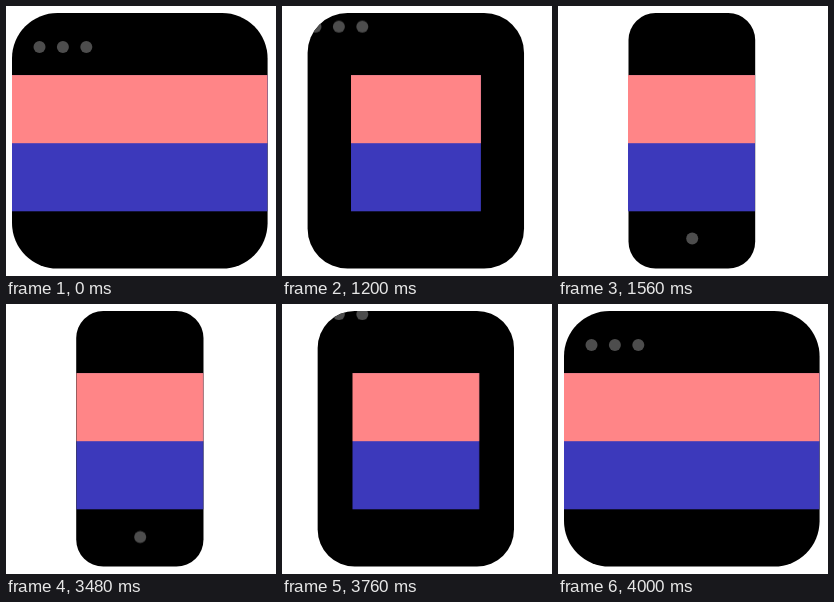
Write an HTML page that moves like this. It is 270 px wide and 270 px high and loops after 5.04 s.

```html
<!DOCTYPE html>
<html lang="en">
<head>
<meta charset="utf-8">
<title>Window to phone</title>
<style>
  html, body {
    margin: 0;
    width: 100%;
    height: 100%;
    overflow: hidden;
    background: #fff;
  }

  svg { display: block; }

  .device, .bands, .dots, .button { animation: 5040ms linear infinite; }
  .device { animation-name: device; }
  .bands { animation-name: bands; transform-origin: 134.2px 137px; }
  .dots { animation-name: dots; }
  .button { animation-name: button; }

  /* closing and opening are time-mirrored curves */
  @keyframes device {
    0%, 79.3651%, 100% { clip-path: inset(7px 8.4px 7.4px 6px round 45.5px); }
    19.8413% {
      clip-path: inset(7px 8.4px 7.4px 6px round 45.5px);
      animation-timing-function: cubic-bezier(.5, 0, .35, 1);
    }
    30.9524% { clip-path: inset(7px 72.8px 7.4px 70.5px round 27px); }
    68.254% {
      clip-path: inset(7px 72.8px 7.4px 70.5px round 27px);
      animation-timing-function: cubic-bezier(.65, 0, .5, 1);
    }
  }

  @keyframes bands {
    0%, 79.3651%, 100% { transform: scaleX(1); }
    19.8413% {
      transform: scaleX(1);
      animation-timing-function: cubic-bezier(.8, 0, .3, 1);
    }
    24.6032% { transform: scaleX(.4969); }
    74.6032% {
      transform: scaleX(.4969);
      animation-timing-function: cubic-bezier(.7, 0, .2, 1);
    }
  }

  @keyframes dots {
    0%, 79.3651%, 100% { transform: translateY(0); }
    19.8413% { transform: translateY(0); animation-timing-function: cubic-bezier(.5, 0, .35, 1); }
    30.9524% { transform: translateY(-67px); }
    68.254% { transform: translateY(-67px); animation-timing-function: cubic-bezier(.65, 0, .5, 1); }
  }

  @keyframes button {
    0%, 79.3651%, 100% { transform: translateY(113px); }
    19.8413% { transform: translateY(113px); animation-timing-function: cubic-bezier(.5, 0, .35, 1); }
    30.9524% { transform: translateY(0); }
    68.254% { transform: translateY(0); animation-timing-function: cubic-bezier(.65, 0, .5, 1); }
  }
</style>
</head>
<body>
<svg class="device" width="270" height="270" viewBox="0 0 270 270">
  <rect width="270" height="270"/>
  <g class="bands">
    <rect x="6" y="69.1" width="255.4" height="136.2" fill="#3c39bb"/>
    <rect x="6" y="69.1" width="255.4" height="68.1" fill="#ff8587"/>
  </g>
  <g fill="#4d4d4d">
    <g class="dots">
      <circle cx="33.5" cy="41" r="6"/>
      <circle cx="56.9" cy="41" r="6"/>
      <circle cx="80.3" cy="41" r="6"/>
    </g>
    <circle class="button" cx="134.2" cy="232.4" r="6"/>
  </g>
</svg>
</body>
</html>
```
